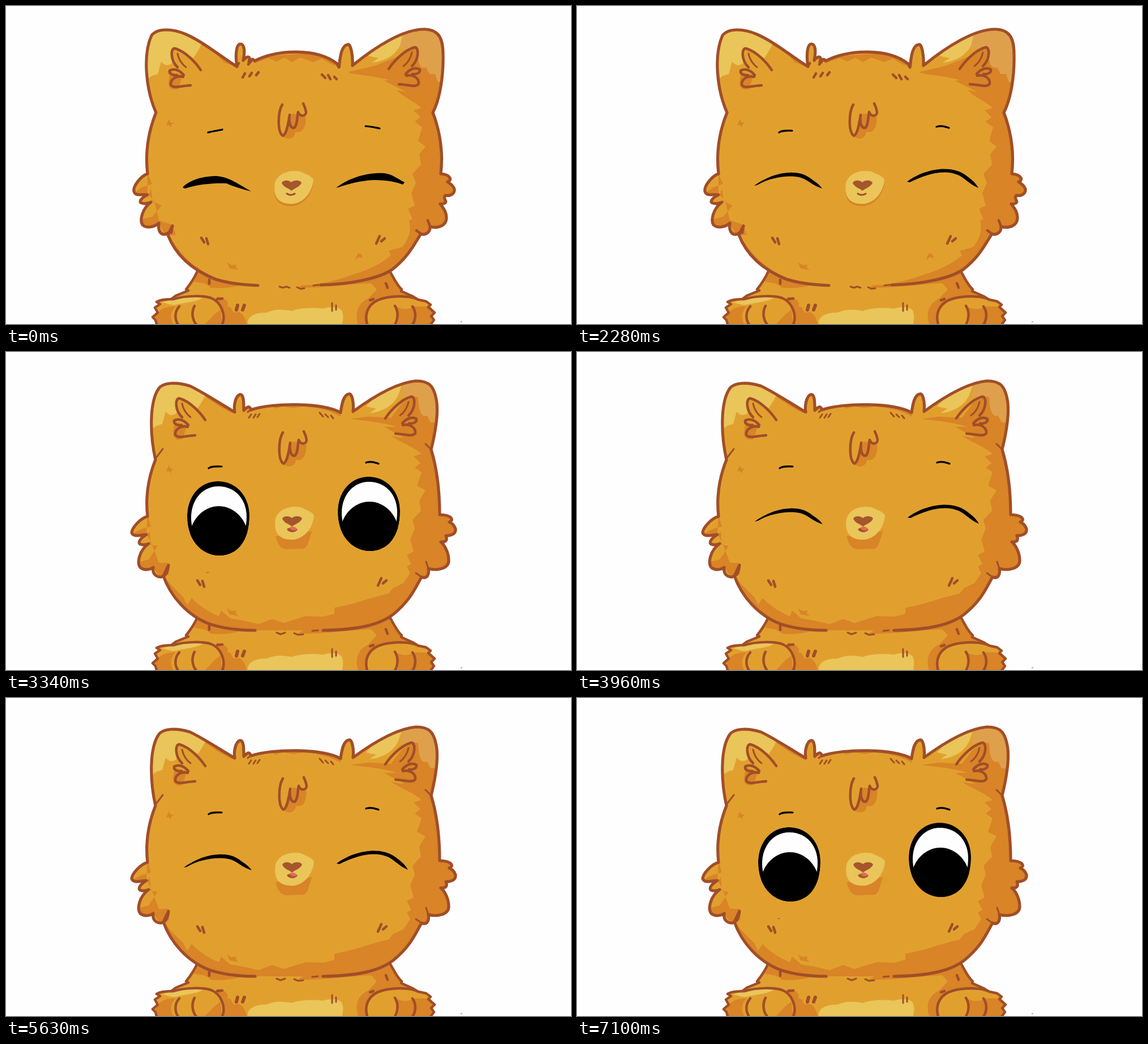
Recreate the animation shown at these times as an HTML page. Size 998 by 561 pixels, loop 7350 ms.

```html
<!DOCTYPE html>
<html lang="en">
<head>
<meta charset="utf-8">
<title>Ginger cat</title>
<style>
  html, body { margin: 0; width: 100%; height: 100%; overflow: hidden; background: #fefefe; }
  svg { display: block; width: 998px; height: 561px; }
  .fur { fill: #e1a02e; }
  .shade { fill: #d88427; }
  .light { fill: #eac55a; }
  .pale { fill: #dfa04c; }
  .brown { fill: #a5562c; }
  .tongue { fill: #e5695f; }
  .white { fill: #fefefe; }
  .line { fill: none; stroke: #a14e28; stroke-width: 4.5; stroke-linecap: round; stroke-linejoin: round; }
  .edge { stroke-width: 5.2; }
  .bold { stroke-width: 6; }
  .thin { stroke-width: 3; }
  .brow { fill: none; stroke: #000; stroke-width: 3.2; stroke-linecap: round; }
  [data-eyes], [data-mouth], [data-head] { display: none; }
</style>
</head>
<body>
<svg viewBox="0 0 998 561">
  <defs>
    <path id="headA" d="M556,492 C610,491 660,480 682,465 C712,442 722,418 733,402
      C742,405 750,398 749,389 C762,393 778,388 778,374 C778,362 772,356 767,349
      C773,350 779,347 776,343 C774,339 774,336 776,334 C785,336 793,331 792,323
      C790,316 784,313 780,310 C787,309 788,298 768,296 C772,262 768,225 754,188
      C766,165 773,125 772,85 C772,55 763,42 740,41 C704,40 655,70 612,105
      C613,88 609,66 604,68 C591,69 590,95 588,108 L585,102 C550,74 480,76 439,97
      C436,92 432,94 429,99 C433,88 426,87 419,96 C422,82 422,67 414,67 C406,67 405,90 408,107
      C383,92 350,64 318,50 C295,40 268,38 257,52 C242,85 246,145 265,188
      C250,225 246,262 250,296 C238,300 224,318 226,327 C228,336 240,332 250,333
      C240,338 235,344 238,347 C244,350 252,348 256,346 C240,358 236,378 241,386
      C248,393 262,390 270,383 C268,395 272,403 280,403 C288,402 292,395 294,388
      L286,404 C300,440 330,466 370,482 C395,490 420,492 445,493"/>
    <path id="headB" d="M560,491 C620,490 660,482 685,462 C715,437 722,418 734,397
      C744,401 748,392 746,382 C760,386 782,383 782,368 C782,355 776,342 768,335
      C775,336 781,333 777,324 C785,324 795,322 794,312 C791,304 787,302 783,300
      C790,298 791,288 766,287 C766,255 764,215 751,172 C760,135 763,110 761,90
      C757,60 748,51 724,51 C690,54 650,78 613,105 C615,90 611,72 606,74
      C596,75 593,92 591,107 C560,89 470,89 433,102 C430,95 428,95 420,103
      C420,88 420,74 413,75 C405,78 402,95 404,106 C380,92 350,72 325,60
      C300,52 278,54 270,64 C253,88 254,145 264,190 C252,220 246,255 250,290
      C238,293 222,310 222,319 C226,328 240,322 248,322 C238,328 232,336 237,339
      C243,341 248,340 252,338 C235,350 231,372 237,380 C244,386 255,384 260,380
      C258,392 266,397 274,397 C284,394 286,385 287,376 L278,395
      C290,430 320,465 360,480 C385,488 410,491 440,491"/>
    <clipPath id="clipA"><use href="#headA"/></clipPath>
    <clipPath id="clipB"><use href="#headB"/></clipPath>

    <path id="earLight" class="light" d="M235,130 L235,25 L320,38 L346,66 C340,78 336,84 331,92
      L318,84 L300,74 L292,80 L294,100 C288,106 280,106 274,98 L268,120 L258,123 L248,130Z"/>
    <path id="earBright" class="light" d="M640,88 C655,70 680,52 708,36 L697,68 C688,86 672,97 646,100 L658,92Z"/>
    <path id="earPale" class="pale" d="M698,30 L790,30 L785,140 L762,133 L758,120 L748,120 L742,108
      C734,112 727,105 726,76 C716,72 706,76 694,76 C700,60 698,50 706,40Z"/>
    <g id="tuft">
      <path class="shade" d="M290,116 L312,122 L304,146 C296,150 286,146 287,134Z"/>
      <g class="line">
        <path d="M303,108 C290,96 290,73 299,75 C316,80 334,98 344,113"/>
        <path class="thin" d="M303,84 C305,95 312,104 318,108"/>
        <path d="M314,122 C306,112 296,110 289,114 C288,120 295,123 302,122"/>
        <path d="M313,125 C300,122 290,130 291,139 C296,147 312,140 326,140"/>
      </g>
    </g>
    <g id="curl">
      <path class="shade" d="M489,230 C500,238 510,233 511,222 C525,226 531,212 529,192 L505,190Z"/>
      <path class="line" d="M488,174 C480,187 479,222 489,229 C496,226 499,205 501,192 C499,205 502,216 509,215
        C515,210 514,195 516,187 C520,197 530,194 530,187 C529,180 526,174 525,172"/>
    </g>
    <g id="spots" class="shade">
      <path d="M288,200 L290,205 L297,207 L292,209 L292,214 L287,210 L283,211 L285,206Z"/>
      <path d="M390,452 L398,457 L407,456 L406,461 L411,466 L402,464 L395,463Z"/>
    </g>
    <path id="chinL" class="line" d="M345,409 L350,417 M354,410 L357,420"/>
    <path id="chinR" class="line" d="M660,406 L654,419 M669,410 L663,415"/>

    <path id="rim" d="M372,246 C405,245 429,272 429,307 C429,350 408,377 376,377 C343,377 319,348 319,308 C319,274 340,247 372,246Z"/>
    <path id="white" class="white" d="M374,255 C404,255 424,278 424,309 C424,345 404,370 376,370 C347,370 326,344 326,310 C326,279 346,255 374,255Z"/>
    <path id="pupil" d="M373,265 C398,265 414,286 415,311 C415,341 399,361 375,361 C350,361 333,340 333,312 C333,286 350,265 373,265Z"/>
    <clipPath id="socket"><use href="#rim"/></clipPath>
    <g id="eyeOpen"><use href="#rim"/><use href="#white"/><use href="#pupil"/></g>
    <g id="eyeMid" clip-path="url(#socket)">
      <use href="#rim"/><use href="#white"/>
      <ellipse cx="374" cy="328" rx="45" ry="52"/>
    </g>
    <g id="eyeDown" clip-path="url(#socket)">
      <use href="#rim"/><use href="#white"/>
      <ellipse cx="375" cy="348" rx="52" ry="58"/>
    </g>
    <path id="browsCurved" class="brow" d="M357,223 C363,219 371,220 380,220 M635,213 C643,211 648,212 657,215"/>
    <path id="browsFlat" class="brow" d="M357,223 C365,221 373,220 382,218 M635,212 C643,212 650,214 660,216"/>
    <g id="squint">
      <path d="M312,320 C325,306 350,300 372,300 C395,302 410,314 433,327 C420,324 400,318 390,313 C370,312 340,314 316,322Z"/>
      <path d="M583,321 C605,303 640,293 668,295 C683,297 690,304 704,311 L701,315 C690,311 675,307 650,307 C625,308 605,314 583,321Z"/>
    </g>

    <path id="muzzle" d="M475,312 C482,292 505,289 520,292 C530,297 543,301 543,308
      C541,325 530,345 508,349 C490,350 470,345 475,312Z"/>
    <path id="nose" class="brown" d="M487,312 C490,306 500,307 504,311 C510,306 520,307 522,312 C518,320 510,321 504,326 C499,321 490,320 487,312Z"/>
    <path id="smile" class="line thin" d="M496,331 C500,334 506,334 510,331"/>

    <g id="face">
      <use href="#muzzle" class="light"/>
      <g data-mouth="plain"><use href="#nose"/><use href="#smile"/></g>
      <g data-mouth="tongue">
        <use href="#nose"/>
        <path class="brown" d="M495,331 C500,326 510,326 514,331 C511,337 500,338 495,331Z"/>
        <path class="tongue" d="M500,328 C505,324 512,327 513,331 C508,334 502,333 500,328Z"/>
      </g>
      <g data-mouth="wide">
        <use href="#nose" y="-1"/>
        <path class="brown" d="M496,330 C500,326 508,326 511,330 C509,336 499,336 496,330Z"/>
        <path class="tongue" d="M498,331 C502,328 507,329 509,332 C506,335 501,335 498,331Z"/>
      </g>
      <g data-mouth="side">
        <use href="#nose" y="-1"/>
        <path class="brown" d="M488,330 C496,326 507,326 511,330 C507,336 492,336 488,330Z"/>
        <path class="tongue" d="M483,330 C488,326 497,328 501,331 C496,336 486,335 483,330Z"/>
      </g>

      <g data-eyes="squint"><use href="#browsFlat"/><use href="#squint"/></g>
      <g data-eyes="low"><use href="#browsFlat"/><use href="#squint" y="5"/></g>
      <g data-eyes="shut">
        <use href="#browsCurved"/>
        <path d="M313,317 C345,293 388,286 411,303 C420,310 427,313 433,322 C420,318 412,311 403,306 C385,296 345,300 318,316Z"/>
        <path d="M583,310 C610,289 658,278 686,298 C695,305 702,309 709,321 C697,316 690,309 680,302 C655,286 620,295 588,311Z"/>
      </g>
      <g data-eyes="open">
        <use href="#browsCurved"/><use href="#eyeOpen"/><use href="#eyeOpen" x="267" y="-8.5"/>
      </g>
      <g data-eyes="mid">
        <use href="#browsCurved"/><use href="#eyeMid"/><use href="#eyeMid" x="267" y="-8"/>
      </g>
      <g data-eyes="down">
        <use href="#browsCurved"/><use href="#eyeDown"/><use href="#eyeDown" x="266" y="-8"/>
        <path class="brown" d="M352,407 L358,406 L356,408Z"/>
      </g>
    </g>
  </defs>

  <g id="body">
    <path class="fur" d="M338,468 C332,482 326,490 318,500 L322,503 L300,512 L290,520 L290,565 L725,565 L725,515 L704,506 L698,502 C690,492 684,476 678,468Z"/>
    <path class="shade" d="M332,486 C345,490 350,486 362,497 C380,499 400,497 418,491 L380,470 L340,470Z"/>
    <path class="shade" d="M515,497 C560,498 600,491 645,489 L655,500 L640,516 L720,514 L698,502 C690,492 684,476 678,468 L560,470Z"/>
    <path class="shade" d="M372,513 C388,514 396,524 390,530 C402,530 396,538 404,541 C414,536 422,546 425,561 L380,561Z"/>
    <path class="shade" d="M700,506 C680,504 655,510 640,516 C618,526 617,546 622,561 L650,561 L690,514Z"/>
    <path class="light" d="M427,562 C425,548 440,540 460,541 C475,534 490,535 505,538 C520,532 545,532 560,534 C575,529 592,531 594,540 C597,550 594,556 594,562Z"/>
    <path class="line" d="M338,468 C332,482 326,490 318,500 L322,502 L300,511 L292,517 M678,468 C684,478 690,492 699,500 L698,503 L718,512 L726,517"/>

    <path class="fur" d="M266,565 L264,554 L259,549 L268,541 L263,532 L272,526 L266,522 C278,516 288,518 296,517 C320,510 348,511 362,515 C380,522 387,540 383,565Z"/>
    <path class="light" d="M275,523 L296,517 C315,512 335,512 348,514 C338,522 322,522 304,526 C292,530 286,524 275,523Z"/>
    <path class="shade" d="M266,565 L264,550 L268,541 C278,530 290,530 300,530 C288,540 290,555 298,565Z M348,565 L368,544 L379,535 L382,565Z"/>
    <path class="line" d="M266,561 L264,554 L259,549 L268,541 L263,532 L272,526 L266,522 C278,516 288,518 296,517 C320,510 348,511 362,515 C380,522 389,545 382,562 M373,517 L382,516 M306,530 C297,540 298,553 304,562 M333,529 C327,540 329,553 336,562"/>

    <path class="fur" d="M637,565 C632,540 642,522 665,516 C690,510 718,512 728,518 L742,521 L750,527 L746,531 L757,541 L751,547 L756,554 L750,565Z"/>
    <path class="shade" d="M690,565 C696,548 694,538 688,530 C700,536 712,536 720,530 L738,530 L746,531 L756,541 L750,565Z"/>
    <path class="line" d="M638,562 C632,540 642,522 665,516 C690,510 718,512 728,518 L742,521 L750,527 L746,531 L757,541 L751,547 L756,554 L750,562 M649,517 L643,519 M687,529 C694,540 692,553 687,562 M718,530 C725,540 724,553 718,562"/>

    <path class="line bold" d="M409,528 L407,536 M421,528 L418,536"/>
    <path class="line" d="M359,483 L359,490 M671,489 L674,497"/>
    <path class="line thin" d="M576,524 L576,538 M583,528 L583,536"/>
    <path fill="#777" d="M802,557 L806,556 L805,558Z"/>
  </g>

  <g data-head="A">
    <use href="#headA" class="fur"/>
    <g clip-path="url(#clipA)">
      <path class="shade" d="M606,116 L650,106 L690,90 L790,40 L810,420 L600,520 L515,496 C560,490 585,484 612,474 C640,466 660,456 680,440
        L676,432 L700,425 C712,410 716,395 712,378 L718,376 L710,358 L722,352 L716,330 L724,312 L718,296 L733,280 L730,262
        L741,248 L728,238 L735,214 L722,204 L732,196 L720,184 L734,180 C722,168 702,162 690,148 L708,152 L668,132 L676,130
        C650,124 625,122 606,118Z"/>
      <path class="shade" d="M435,90 L590,80 L592,108 L575,103 L558,93 L542,99 L520,91 L505,99 L492,91 L478,98 L463,92 L440,101Z"/>
      <path class="shade" d="M330,60 L405,100 L408,108 L384,99 L366,78 L346,70Z"/>
      <path class="shade" d="M250,296 L258,314 L240,320 L224,332 L252,334 L256,322 L259,344 L275,352 L258,372 L240,376 L240,392 L270,384 L282,405 L300,404 L294,386 L270,378 L262,345 L250,330Z"/>
      <path class="shade" d="M285,400 C310,445 340,466 372,480 L412,490 L440,496 L330,480Z"/>
      <use href="#earLight"/>
      <use href="#earBright"/>
      <use href="#earPale"/>
    </g>
    <use href="#headA" class="line edge"/>
    <use href="#tuft"/>
    <use href="#tuft" transform="translate(1020 -2) scale(-1 1)"/>
    <path class="line" d="M422,119 L418,126 M434,118 L430,124 M446,117 L442,122 M558,121 L564,127 M569,122 L573,129 M580,125 L584,129"/>
    <path class="line" d="M408,106 L411,101 M433,97 L428,103 M294,388 L292,400 M725,396 L733,402 M745,378 L749,389"/>
    <use href="#curl"/>
    <use href="#spots"/>
    <path class="shade" d="M622,436 L628,438 L630,445 L623,443 L617,448 L619,441Z"/>
    <use href="#chinL"/><use href="#chinR"/>
    <path class="line thin" d="M483,495 L489,497 L495,495 L501,497 M514,496 L520,499 L527,498 M543,493 L552,492"/>
    <use href="#muzzle" class="shade" y="4"/>
    <use href="#face"/>
  </g>

  <g data-head="B">
    <use href="#headB" class="fur"/>
    <g clip-path="url(#clipB)">
      <path class="shade" d="M680,116 L700,90 L790,40 L810,400 L600,520 L360,520 L260,400 L276,392 C290,410 300,420 313,432 L320,446 L328,434
        C345,452 365,462 376,466 L380,456 L396,470 L420,474 L446,480 L470,471 L490,478 L530,466 L560,467 L580,462 L580,451
        C610,447 640,434 676,426 L684,416 L702,408 L714,390 L708,378 L716,374 L708,358 L720,352 L714,330 L722,312 L718,296 L733,280
        L730,262 L741,244 L726,236 L734,212 L722,204 L732,196 L720,184 L734,180 C722,168 702,162 680,148 L704,152 L668,132 L690,132
        C665,124 640,122 608,118 L640,114Z"/>
      <path class="shade" d="M470,92 L555,94 L590,105 L592,114 L570,104 L545,98 L525,96 L508,99 L490,96 L474,100Z"/>
      <path class="shade" d="M338,66 L404,104 L400,108 L380,98 L356,82Z"/>
      <path class="shade" d="M250,288 L256,308 L240,312 L220,322 L248,324 L254,316 L256,340 L268,342 L252,366 L236,370 L236,384 L260,380 L274,400 L288,392 L287,372 L270,372 L258,340 L248,320Z"/>
      <use href="#earLight" x="8" y="7"/>
      <use href="#earBright" x="-4" y="8"/>
      <use href="#earPale" x="2" y="4"/>
    </g>
    <use href="#headB" class="line edge"/>
    <use href="#tuft" x="8" y="7"/>
    <use href="#tuft" transform="translate(1014 4) scale(-1 1)"/>
    <path class="line thin" d="M433,110 L429,116 M441,110 L437,116 M448,109 L444,115 M554,107 L560,114 M564,110 L569,115 M574,112 L578,117"/>
    <path class="line thin" d="M433,101 L427,106 M264,188 L277,171 M751,172 L741,162 M287,376 L284,389 M742,370 L746,382 M724,390 L734,397"/>
    <use href="#curl" x="1" y="-32"/>
    <use href="#spots"/>
    <use href="#chinL" x="-7" y="-6"/><use href="#chinR" x="3" y="-7"/>
    <path class="line thin" d="M478,495 L485,498 L493,495 M509,496 L516,499 L525,498 M541,492 L551,491"/>
    <path class="shade" d="M476,325 C480,338 483,346 495,348 L526,347 C535,343 535,328 541,316Z"/>
    <use href="#face" x="1" y="-18"/>
  </g>
</svg>
<script>
  const LOOP = 7350;
  // start (ms), head, eyes, mouth
  const poses = [
    [0, 'A', 'squint', 'plain'],
    [580, 'A', 'low', 'plain'],
    [780, 'A', 'open', 'plain'],
    [2280, 'A', 'shut', 'plain'],
    [2480, 'A', 'open', 'plain'],
    [2680, 'B', 'open', 'plain'],
    [3260, 'B', 'mid', 'plain'],
    [3340, 'B', 'down', 'tongue'],
    [3840, 'B', 'squint', 'tongue'],
    [3960, 'B', 'shut', 'tongue'],
    [4160, 'B', 'squint', 'tongue'],
    [4240, 'B', 'down', 'wide'],
    [4650, 'B', 'down', 'side'],
    [5060, 'B', 'down', 'wide'],
    [5470, 'B', 'down', 'tongue'],
    [5630, 'B', 'shut', 'tongue'],
    [5830, 'B', 'squint', 'tongue'],
    [5870, 'B', 'down', 'tongue'],
    [6280, 'B', 'down', 'wide'],
    [6690, 'B', 'down', 'plain'],
    [7100, 'B', 'down', 'tongue']
  ];
  const layers = ['head', 'eyes', 'mouth'].map(key =>
    [...document.querySelectorAll(`[data-${key}]`)].map(el => ({ el, name: el.dataset[key] })));
  let shown;

  function show(pose) {
    if (pose === shown) return;
    shown = pose;
    layers.forEach((layer, i) => layer.forEach(({ el, name }) => {
      el.style.display = name === pose[i + 1] ? 'inline' : 'none';
    }));
  }

  function tick() {
    const t = performance.now() % LOOP;
    show(poses.findLast(pose => pose[0] <= t));
    requestAnimationFrame(tick);
  }
  tick();
</script>
</body>
</html>
```
